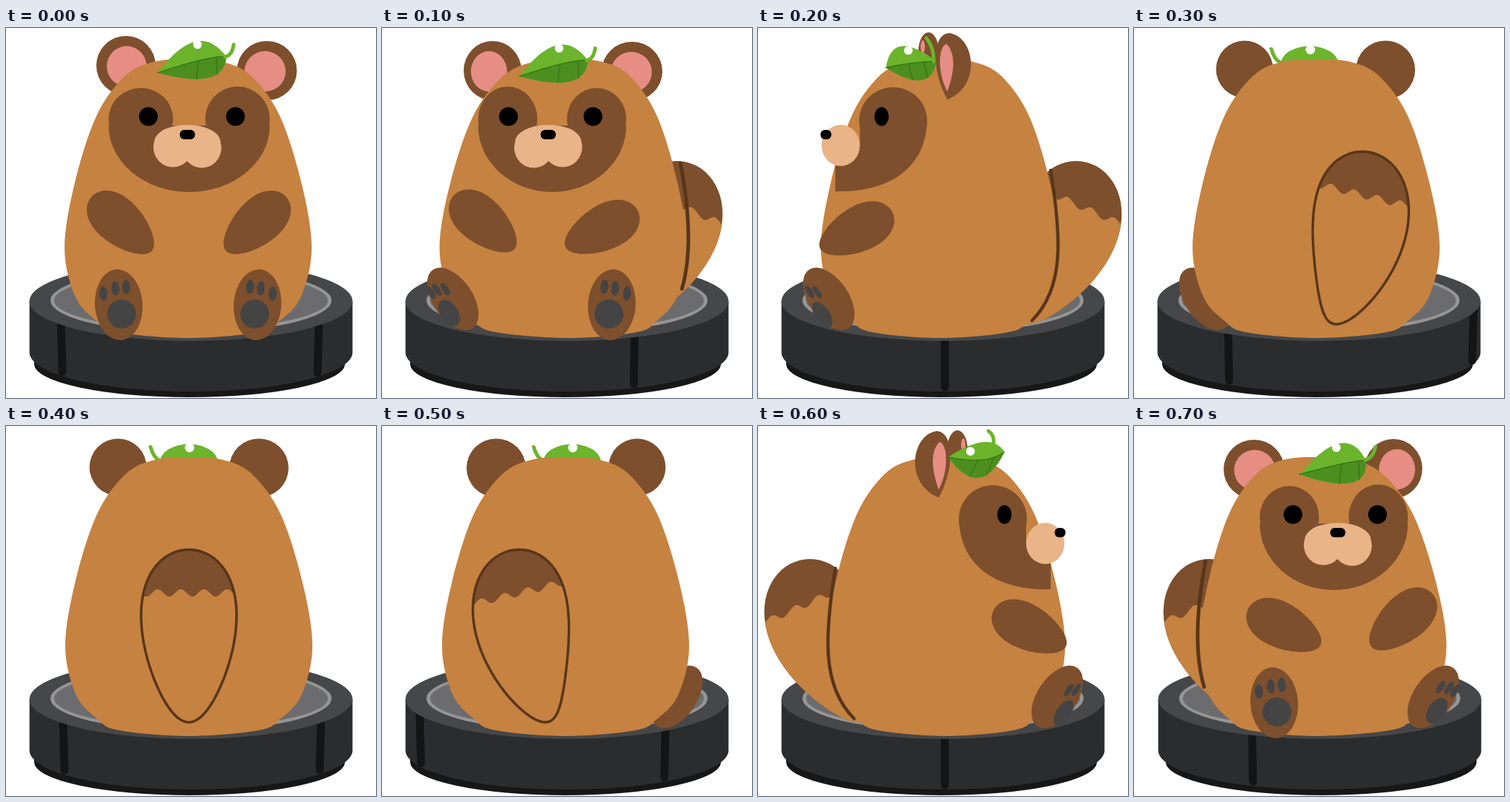
An HTML page that plays this animation: 512x512 px, repeating every 0.8 s.

```html
<!DOCTYPE html>
<html lang="en">
<head>
<meta charset="utf-8">
<title>Spinning tanuki</title>
<style>
html, body { margin: 0; width: 100%; height: 100%; overflow: hidden; background: #fff; }
svg { display: block; width: 100vw; height: 100vh; }
.pose { opacity: 0; }
.pose:first-child { opacity: 1; }
</style>
</head>
<body>
<svg id="stage" viewBox="0 0 512 512"></svg>
<script>
const FUR = '#c68240', BROWN = '#7d4f2d', LINE = '#57361b', CREAM = '#e8b488', PINK = '#e68d84',
  PAD = '#444444', LEAF = '#6bb42c', SHADE = '#4c8f20', VEIN = '#3a7618', BLACK = '#000';
const STEP = 100, COUNT = 8, TAU = Math.PI * 2;

const fill = (d, color) => `<path d="${d}" fill="${color}"/>`;
const stroke = (d, color, w) =>
  `<path d="${d}" fill="none" stroke="${color}" stroke-width="${w}" stroke-linecap="round"/>`;
const oval = (x, y, rx, ry, color, turn = 0) =>
  `<ellipse cx="${x}" cy="${y}" rx="${rx}" ry="${ry}" fill="${color}" transform="rotate(${turn} ${x} ${y})"/>`;
const place = (x, y, turn, art) => `<g transform="translate(${x} ${y}) rotate(${turn})">${art}</g>`;
const flip = (width, art) => `<g transform="matrix(-1 0 0 1 ${width} 0)">${art}</g>`;

// Closed outline of f(angle) for one full turn.
const ring = f =>
  'M' + Array.from({ length: 72 }, (_, i) => f(i / 72 * TAU).map(v => v.toFixed(1))).join('L') + 'Z';

// Smooth closed curve through a few points.
function loop(p) {
  const at = i => p[(i + p.length) % p.length];
  return 'M' + p[0] + p.map((b, i) => {
    const a = at(i - 1), c = at(i + 1), e = at(i + 2);
    return `C${b.map((v, k) => v + (c[k] - a[k]) / 6)} ${c.map((v, k) => v - (e[k] - b[k]) / 6)} ${c}`;
  }).join('') + 'Z';
}

function base(seams, shift = 0) {
  const seam = x => {
    const bend = Math.sqrt(1 - ((x - 256) / 224) ** 2) * 53;
    const lean = (256 - x) / 90;
    return stroke(`M${x - lean / 2} ${375 + bend}L${x + lean / 2} ${444 + bend}`, '#141414', 11);
  };
  const under = 254 + shift * 5;
  return fill(`M${under - 215} 452V465A215 46 0 0 0 ${under + 215} 465V452Z`, '#171717') +
    place(shift, 0, 0,
      fill('M32.5 378V449A223.5 54 0 0 0 479.5 449V378Z', '#2b2c2e') + seams.map(seam).join('') +
      oval(256, 378, 223.5, 55, '#454749') +
      oval(256, 377, 194.5, 44.5, '#959595') + oval(256, 377, 189.5, 39.5, '#6c6c6e'));
}

// Half outline from the crown down, mirrored with its own width on each side.
const HALF = [[48, 47], [88, 67], [127, 122], [157, 215], [171, 305], [156, 372], [127, 405], [97, 421]];
function body(left, right, x = 252) {
  const half = w => HALF.map(([dx, y]) => [x + dx * w, y]);
  return fill(loop([[x, 43], ...half(right), [x, 429], ...half(-left).reverse()]), FUR);
}

let clips = 0;
function tail(x, top, lean, line) {
  const h = (410 - top) / 2, id = 'tail' + clips++;
  const d = ring(a => [
    x - lean * ((1 - Math.cos(a)) / 2) ** 3 + Math.sin(a) * (64 + 17 * Math.cos(a)),
    top + h - h * Math.cos(a)
  ]);
  let edge = `M${x - 160} 420`;
  for (let dx = -70; dx <= 70; dx += 2) {
    edge += `L${x + dx} ${top + 60 + dx * lean / 150 - 5 * Math.cos((dx + 11) / 32 * TAU)}`;
  }
  return `<clipPath id="${id}"><path d="${d}"/></clipPath>` + fill(d, BROWN) +
    `<g clip-path="url(#${id})">${fill(edge + `V420Z`, FUR)}</g>` + (line ? stroke(d, LINE, line) : '');
}

const arm = (x, y, turn) => place(x, y, turn,
  fill(ring(a => [56 * Math.cos(a), 31 * Math.sin(a) * (1 - 0.2 * Math.cos(a))]), BROWN));

// Turning the foot slides its pads outward and squeezes them.
function foot(x, y, turn, rx, slide = 0, squeeze = 1) {
  const toe = (dx, dy) => {
    const tx = dx * squeeze + slide;
    return tx < 24 ? oval(tx, dy, 5.5 * Math.sqrt(squeeze), 10, PAD) : '';
  };
  return place(x, y, turn, oval(0, 0, rx, 49, BROWN) + oval(slide + 3 * squeeze, 13, 20 * squeeze, 20, PAD) +
    toe(-20, -17) + toe(-3, -23) + toe(12, -24));
}

function mask(x0, x1) {
  const w = x1 - x0, r = w / 5;
  return oval(x0 + r, 126, r, 43, BROWN) + oval(x1 - r, 126, r, 45, BROWN) +
    fill(`M${x0} 135A${w / 2} 92 0 0 0 ${x1} 135Z`, BROWN);
}
const nose = (x, w) => `<rect x="${x - w / 2}" y="141" width="${w}" height="13" rx="6" fill="${BLACK}"/>`;
const muzzle = x => oval(x - 20, 165, 27, 27.5, CREAM) + oval(x + 20, 166, 27, 27.5, CREAM) +
  oval(x, 158, 46, 24, CREAM) + nose(x, 21);
const eye = (x, rx = 13) => oval(x, 122.5, rx, 13, BLACK);
const ear = (x, y, r, dx, pr) => oval(x, y, r, 41, BROWN) + oval(x + dx, y + 1, pr, 28, PINK);

// Lens between tip and end; the control points bend its upper and lower edge.
function leaf(tip, over, end, under, notch, stem) {
  const mid = over.map((v, k) => (v + under[k]) / 2);
  const on = (c, t) => c.map((v, k) => (1 - t) ** 2 * tip[k] + 2 * t * (1 - t) * v + t * t * end[k]);
  const veins = [0.35, 0.65].map(t => stroke(`M${on(mid, t + 0.1)}L${on(under, t)}`, VEIN, 1.5)).join('');
  return fill(`M${tip}Q${over} ${end}Q${under} ${tip}Z`, LEAF) + fill(`M${tip}Q${mid} ${end}Q${under} ${tip}Z`, SHADE) +
    stroke(`M${tip}Q${mid} ${end}`, VEIN, 1.5) + veins + oval(...notch, 6, 6, '#fff') + stroke(stem, LEAF, 5);
}
const backLeaf = x => fill(`M${x - 40} 50A40 25 0 0 1 ${x + 40} 50Z`, LEAF) + oval(x + 1, 30, 6.5, 6.5, '#fff') +
  stroke(`M${x - 40} 48Q${x - 49} 44 ${x - 53} 29`, LEAF, 5);

const frontLeaf = leaf([210, 62], [266, -13], [305, 40], [302, 87], [265, 23], 'M303 40Q313 38 315 23');
const turnLeaf = leaf([229, 67], [293, -9], [321, 48], [325, 100], [280, 30], 'M320 47Q331 44 334 29');
const leftLeaf = leaf([177, 55], [185, 0], [247, 46], [239, 94], [208, 31], 'M243 46Q244 28 233 14');
const rightLeaf = leaf([263, 43], [322, 5], [341, 36], [308, 104], [294, 35], 'M326 24Q327 12 319 7');

const front = ear(166, 52, 41, 1, 27.5) + ear(361, 59, 41.5, -2.5, 28.5) + body(1, 1) +
  mask(142, 365) + muzzle(251) + eye(197) + eye(317.5) +
  arm(160, 271, 42) + arm(346, 271, 138) + foot(156, 383, -4, 33) + flip(504, foot(156, 383, -4, 33));

const quarter = flip(512, tail(408, 184, 66)) + ear(166, 60, 42, 1, 28.5) + ear(359, 59, 40, 5, 25) +
  body(0.95, 1.055) + stroke('M99 187C88 245 82 310 97 361', LINE, 5) +
  mask(174, 379) + muzzle(282) + eye(220) + eye(337) +
  arm(208, 278, 27) + arm(371, 269, 139) + foot(194, 383, -4, 33) + foot(414, 375, 34, 27.5, 13, 0.6);

const side = tail(440, 184, 66) + oval(236, 32, 14, 26, BROWN) + oval(228, 26, 3, 9, PINK) + body(0.965, 0.97) +
  stroke('M405 197C420 290 424 360 379 405', LINE, 4.5) +
  fill('M262 99C240 60 240 8 265 7C300 12 310 80 262 99Z', BROWN) +
  fill('M262 88C247 60 250 24 261 22C274 36 272 60 262 88Z', PINK) +
  oval(187, 128, 47, 46, BROWN) + fill('M107 226V190L141 160V125H234C234 195 180 228 107 226Z', BROWN) +
  oval(114.5, 162.5, 26.5, 28.5, CREAM) + nose(94, 15) + eye(171, 10) +
  arm(136, 280, 153) + flip(512, foot(414, 375, 34, 27.5, 18, 0.5));

const backEars = oval(153, 57, 39.5, 39.5, BROWN) + oval(348, 58, 41, 40.5, BROWN);
const off = oval(98, 375, 27.5, 49, BROWN, -34) + backEars + body(1, 1) + tail(316, 171, 36, 3.5);

const poses = [
  base([77, 432]) + front + frontLeaf,
  base([349]) + flip(512, quarter) + place(-20, 5, 0, frontLeaf),
  base([258.5]) + side + leftLeaf,
  base([131, 469]) + backLeaf(243) + off,
  base([80, 435]) + backLeaf(253) + place(2, 0, 0, backEars) + body(1, 1, 253) + tail(253, 171, 0, 3.5),
  base([53, 391.5]) + backLeaf(263) + flip(506, off),
  base([258.5]) + flip(512, side) + rightLeaf,
  base([163], 1) + quarter + turnLeaf
];

const stage = document.getElementById('stage');
stage.innerHTML = poses.map(art => `<g class="pose">${art}</g>`).join('');
stage.querySelectorAll('.pose').forEach((pose, i) => {
  pose.animate([
    { opacity: i ? 0 : 1, offset: 0 },
    { opacity: 1, offset: i / COUNT },
    { opacity: 0, offset: (i + 1) / COUNT },
    { opacity: 0, offset: 1 }
  ].map(k => ({ ...k, easing: 'steps(1, end)' })), { duration: STEP * COUNT, iterations: Infinity });
});
</script>
</body>
</html>
```
